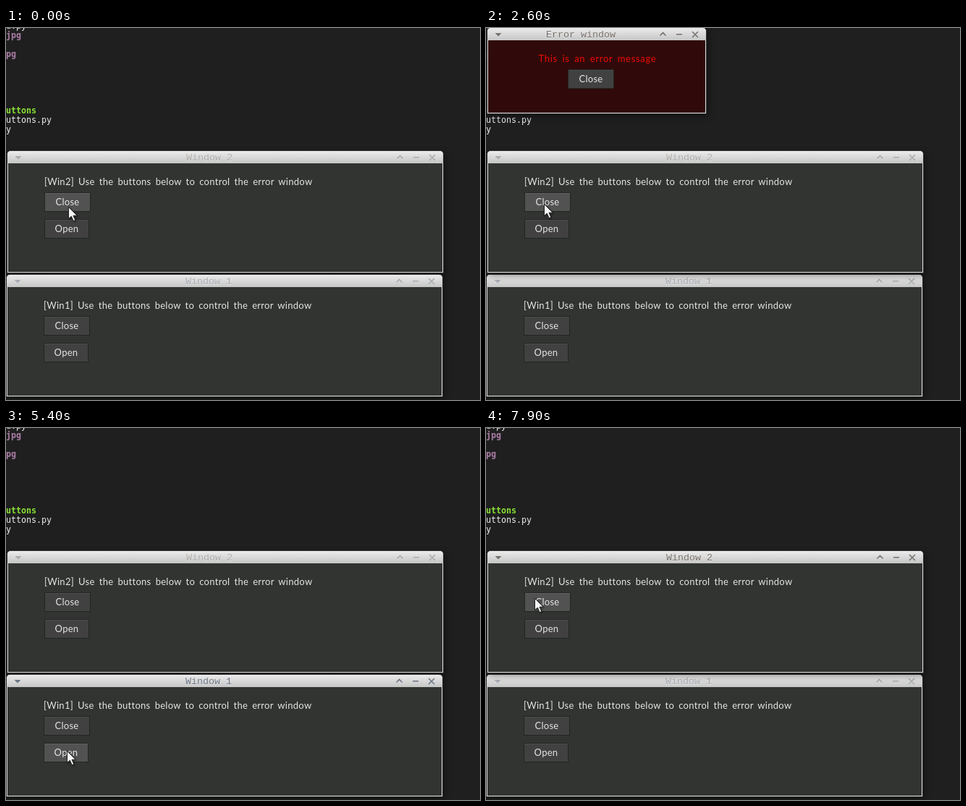
These frames come from a looping animation (655x514 px, 8 s). An HTML page:

```html
<!DOCTYPE html>
<html>
<head>
<meta charset="utf-8">
<style>
html, body { margin: 0; width: 100%; height: 100%; overflow: hidden; background: #1f1f1f; }
svg { display: block; }
text { white-space: pre; }
.term { font: 11.63px "DejaVu Sans Mono", monospace; fill: #eee; }
.term .img { fill: #ad7fa8; font-weight: bold; }
.term .exe { fill: #8ae234; font-weight: bold; }
.win { filter: drop-shadow(2px 3px 5px rgba(0, 0, 0, .42)); }
.title { font: 13.33px "Liberation Mono", monospace; text-anchor: middle; }
.ink { fill: var(--ink); text-shadow: 0 1px 0 rgba(255, 255, 255, .6); }
.icon { fill: none; stroke: var(--ink); stroke-width: 1.6; }
.win { --ink: #aeaba8; }
.win.active { --ink: #77716c; }
#w1 { --ink: #a8adb3; }
#w1.active { --ink: #6c7785; }
.label, .btn text { font: 13px Lato, sans-serif; fill: #e4e4e4; letter-spacing: .28px; word-spacing: 2.5px; }
.label.alert { fill: #f20808; text-anchor: middle; letter-spacing: .7px; }
.btn text { text-anchor: middle; }
.btn .face { fill: #414141; stroke: #232523; }
.btn .edge { stroke: #4d4d4d; }
.btn.hover .face { fill: #525252; }
.btn.hover .edge { stroke: #5e5e5e; }
.btn.press .face { fill: #2f312f; stroke: #484a48; }
.btn.press .edge { stroke: none; }
</style>
</head>
<body>
<svg width="655" height="514" viewBox="0 0 655 514">
  <defs>
    <linearGradient id="chrome" x2="0" y2="1">
      <stop offset="0" stop-color="#ebebeb"/>
      <stop offset="1" stop-color="#c6c6c6"/>
    </linearGradient>
  </defs>
  <g class="term">
    <text y="1">d.py</text>
    <text y="14" class="img">jpg</text>
    <text y="40" class="img">pg</text>
    <text y="118" class="exe">uttons</text>
    <text y="131">uttons.py</text>
    <text y="144">y</text>
  </g>
  <g id="windows"></g>
  <path id="cursor" d="M.5.5V16.6L4.3 13.2 7.2 19.6 9.8 18.5 7 12.2H12.2Z"
    fill="#f6f6f6" stroke="#222" style="filter:drop-shadow(1px 1px 1px rgba(0,0,0,.5))"/>
</svg>
<script>
const $ = id => document.getElementById(id);

const button = (id, x, y, w, label) => `
  <g class="btn" id="${id}" transform="translate(${x} ${y})">
    <rect class="face" x="-.5" y="-.5" width="${w + 1}" height="26"/>
    <path class="edge" d="M0 .5H${w}"/>
    <text x="${w / 2}" y="17">${label}</text>
  </g>`;

// rectangle with rounded top corners, inset by i
const frame = (i, w, h) =>
  `M${i} ${h - i}V6Q${i} ${i} 6 ${i}H${w - 6}Q${w - i} ${i} ${w - i} 6V${h - i}Z`;

const makeWindow = (id, x, y, w, h, title, fill, body) => `
  <g class="win" id="${id}" transform="translate(${x} ${y})">
    <path d="${frame(0, w, h)}" fill="#333"/>
    <path d="${frame(1, w, h)}" fill="#dedede"/>
    <path d="${frame(1, w, 19)}" fill="url(#chrome)"/>
    <rect x="2" y="18" width="${w - 4}" height="${h - 20}" fill="${fill}"/>
    <path class="ink" d="M11.5 8H20.5L16 12.5Z"/>
    <path class="icon" d="M${w - 64.5} 11.5l4-4 4 4M${w - 42} 9.8h8M${w - 20} 6l8 8m0-8l-8 8"/>
    <text class="ink title" x="${w / 2 - 22}" y="14">${title}</text>
    <g transform="translate(2 18)">${body}</g>
  </g>`;

const control = n => `
  <text class="label" x="50" y="30">[Win${n}] Use the buttons below to control the error window</text>
  ${button("c" + n, 51, 41, 62, "Close")}
  ${button("o" + n, 51, 78, 60, "Open")}`;

$("windows").innerHTML =
  makeWindow("w2", 1, 169, 604, 170, "Window 2", "#313431", control(2)) +
  makeWindow("w1", 0, 340, 604, 170, "Window 1", "#313431", control(1)) +
  makeWindow("we", 1, -1, 304, 120, "Error window", "#300a0a", `
    <text class="label alert" x="151" y="30">This is an error message</text>
    ${button("ce", 111, 41, 62, "Close")}`);

// Pointer stops: tick (0.1 s), x, y and the button clicked there.
const stops = [
  [0, 86, 247],
  [4, 83, 276, "o2"], [11, 82, 243, "c2"], [17, 68, 308],
  [22, 80, 286, "o2"], [29, 80, 243, "c2"],
  [34, 87, 457, "o1"], [39, 67, 449], [48, 150, 67, "ce"], [50, 96, 493],
  [55, 84, 446, "o1"], [61, 85, 411, "c1"],
  [70, 82, 458, "o1"], [77, 67, 235, "c2"]
];
const clicks = stops.filter(s => s[3]);
const REST = 3; // ticks the pointer waits on a button before clicking

function pointer(tick) {
  const i = stops.findIndex(s => s[0] >= tick);
  const [t1, x1, y1, id] = stops.at(i);
  if (i < 1) return [x1, y1];
  const [t0, x0, y0] = stops[i - 1];
  const k = Math.min(1, (tick - t0) / (t1 - t0 - (id ? REST : 0)));
  const ease = 1 - (1 - k) ** 2.1;
  return [x0 + (x1 - x0) * ease, y0 + (y1 - y0) * ease].map(Math.round);
}

function contains(el, [x, y]) {
  const r = el.getBoundingClientRect();
  return x >= r.left && x < r.right && y >= r.top && y < r.bottom;
}

function draw(tick) {
  const done = clicks.filter(c => c[0] < tick).map(c => c[3]);
  const last = done.at(-1) ?? "";
  const error = last[0] === "o";
  // closing the error from inside returns to the window that opened it
  const owner = "w" + ((last === "ce" ? done.at(-2) : last)[1] ?? 1);
  const focus = error ? "we" : last && owner;

  $("windows").append($(owner), $("we"));
  $("we").style.display = error ? "" : "none";
  document.querySelectorAll(".win").forEach(w => w.classList.toggle("active", w.id === focus));

  const pressed = clicks.find(c => c[0] === tick)?.[3];
  const seen = pointer(tick - 1); // hover lags one tick behind
  document.querySelectorAll(".btn").forEach(b => {
    b.classList.toggle("press", b.id === pressed);
    b.classList.toggle("hover", b.id !== pressed && contains(b.firstElementChild, seen));
  });
  $("cursor").setAttribute("transform", `translate(${pointer(tick)})`);
}

// the screen is refreshed ten times a second
let start, shown;
function loop(now) {
  start ??= now;
  const tick = Math.floor(Math.max(0, now - start) % 8000 / 100);
  if (tick !== shown) draw(shown = tick);
  requestAnimationFrame(loop);
}
draw(0);
requestAnimationFrame(loop);
</script>
</body>
</html>
```
